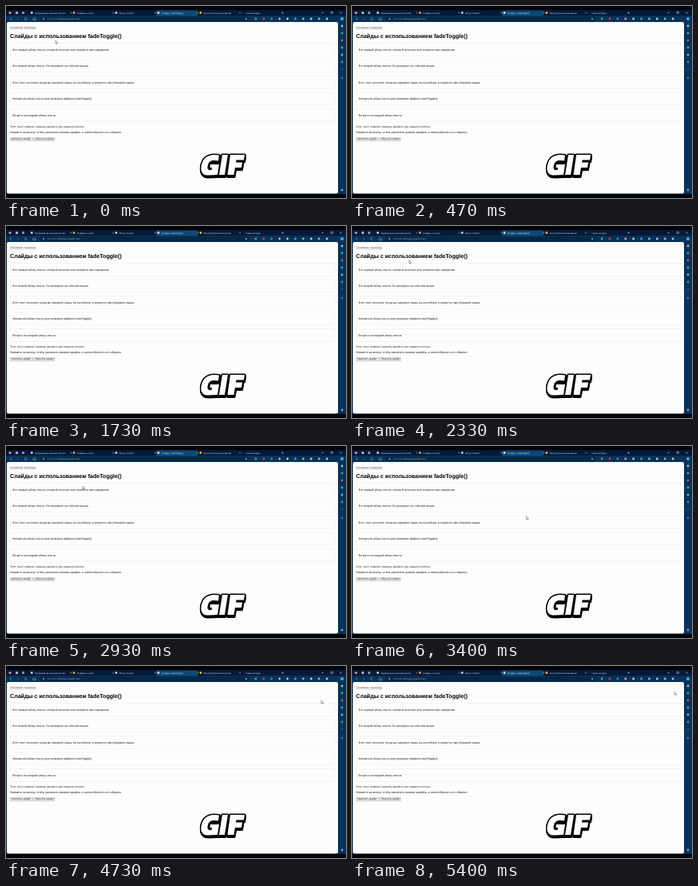
An HTML page with a canvas that plays this animation: 426 px wide and 240 px high, repeating every 5470 ms.

```html
<!DOCTYPE html>
<html lang="ru">
<head>
<meta charset="utf-8">
<title>fadeToggle</title>
<style>
html, body { margin: 0; width: 100%; height: 100%; overflow: hidden; background: #000; }
canvas { display: block; width: 426px; height: 240px; }
</style>
</head>
<body>
<canvas id="stage"></canvas>
<script>
const W = 426, H = 240, LOOP = 5470, STEP = 200 / 3;
const PAGE_SCALE = W / 1920;
const canvas = document.getElementById('stage');
const ratio = window.devicePixelRatio || 1;
canvas.width = W * ratio;
canvas.height = H * ratio;
const ctx = canvas.getContext('2d');
ctx.scale(ratio, ratio);
ctx.textRendering = 'geometricPrecision';

// time, x, y of the pointer tip
const path = [
  [0, 62, 43], [600, 58, 37], [930, 57, 37], [1730, 57, 37], [2400, 72, 43],
  [2930, 96, 50], [3930, 365, 133], [4730, 395, 43], [5400, 404, 32], [LOOP, 404, 32]
];

const paragraphs = [
  'Это первый абзац текста, который исчезнет или появится при наведении',
  'Это второй абзац текста. Он реагирует на события мыши.',
  'Этот текст исчезнет, когда вы наведете мышь на контейнер, и вернется при убирании мыши.',
  'Четвертый абзац текста для проверки эффекта fadeToggle().',
  'Пятый и последний абзац текста.'
];

const tabs = [
  ['Программные решения для ба', '#d8d8d8'], ['Слайды на показ', '#d8a24a'],
  ['Money Transfer', '#c9d3dc'], ['Слайды с fadeToggle()', '#d5dde5'],
  ['Фильтр (Показательный мат', '#f2c230'], ['Новая вкладка', null]
];

function rect(x, y, w, h, color, radius = 0) {
  ctx.fillStyle = color;
  ctx.beginPath();
  ctx.roundRect(x, y, w, h, radius);
  ctx.fill();
}

function dot(x, y, r, color) {
  ctx.fillStyle = color;
  ctx.beginPath();
  ctx.arc(x, y, r, 0, Math.PI * 2);
  ctx.fill();
}

function line(points, color, width = 0.5) {
  ctx.strokeStyle = color;
  ctx.lineWidth = width;
  ctx.beginPath();
  points.forEach(([x, y]) => ctx.lineTo(x, y));
  ctx.stroke();
}

// size is given in the pixels of the full-size screen
function text(value, x, y, size, color = '#161616', weight = 400) {
  ctx.save();
  ctx.translate(x, y);
  ctx.scale(PAGE_SCALE, PAGE_SCALE);
  ctx.font = `${weight} ${size}px "Liberation Sans", Arial, sans-serif`;
  ctx.fillStyle = color;
  ctx.fillText(value, 0, 0);
  ctx.restore();
}

function cross(x, y, color) {
  line([[x - 1, y - 1], [x + 1, y + 1]], color);
  line([[x + 1, y - 1], [x - 1, y + 1]], color);
}

function drawBrowser() {
  rect(0, 0, W, H, '#000308');
  rect(0, 5, W, 230, '#04193a');
  rect(0, 12, W, 8, '#083258');
  rect(416, 20, 10, 215, '#083258');

  dot(5, 8.5, 1.6, '#d99a91');
  rect(12, 7, 3, 3, '#9fb0bf', 0.5);
  rect(20, 7, 3, 3, '#8293a3', 0.5);
  rect(188, 5.5, 52, 7, '#0b4a78', [1.5, 1.5, 0, 0]);
  tabs.forEach(([title, icon], i) => {
    const x = 36 + i * 52.9;
    if (icon) dot(x - 3.7, 8.5, 1.4, icon);
    text(title, x, 9.5, 12, '#dbe5ee');
    if (i < 5) cross(x + 45.5, 8.5, '#a9bccb');
  });
  line([[345, 8.5], [348, 8.5]], '#a9bccb');
  line([[346.5, 7], [346.5, 10]], '#a9bccb');
  line([[395, 8.5], [398, 8.5]], '#d5dde5');
  ctx.strokeRect(407, 7.2, 2.5, 2.5);
  cross(419.5, 8.5, '#d5dde5');

  line([[7, 14.5], [5, 16], [7, 17.5]], '#b7cad8');
  line([[14, 14.5], [16, 16], [14, 17.5]], '#64798a');
  ctx.strokeStyle = '#b7cad8';
  ctx.beginPath();
  ctx.arc(25, 16, 1.5, 0.4, 5.8);
  ctx.stroke();
  line([[33.5, 16], [35.5, 14.5], [37.5, 16], [37, 17.5], [34, 17.5], [33.5, 16]], '#b7cad8');
  rect(42, 13.2, 263, 5.7, '#062845', 2.8);
  dot(47, 16, 1, '#8fa5b6');
  text('127.0.0.1:5500/jquery/slider.html', 52, 17, 12.6, '#9db1c0');
  dot(301, 16, 1.1, '#8fa5b6');
  const tools = ['#52aa63', '#d6434a', '#5484b5', '#d8a4ac', '#b9c7d2',
    '#4a9bd9', '#9daebb', '#b9c7d2', '#9daebb', '#b9c7d2'];
  tools.forEach((color, i) => dot(313 + i * 9.9, 16, 1.4, color));
  dot(421, 16, 2.1, '#4aa7d8');

  ['#9fc2d8', '#4fa58c', '#cf4f5c', '#4c9ddb', '#6eb7d8', '#3f9a74', '#164e9c']
    .forEach((color, i) => dot(421, 25 + i * 9, 1.4, color));
  line([[419.7, 90], [422.3, 90]], '#b7cad8');
  line([[421, 88.7], [421, 91.3]], '#b7cad8');
  dot(421, 230, 1.4, '#6fa3c4');
}

function button(label, x, w) {
  rect(x, 164, w, 4.8, '#888', 0.7);
  rect(x + 0.35, 164.35, w - 0.7, 4.1, '#efefef', 0.5);
  text(label, x + 1.7, 167.4, 13.33, '#111');
}

function drawPage() {
  rect(1, 20, 415, 214.5, '#fdfdfd', 2);
  text('Основная страница', 5, 28.3, 16, '#555');
  line([[5, 28.9], [38, 28.9]], '#777', 0.3);
  text('Слайды с использованием fadeToggle()', 5, 40, 32, '#000', 700);
  paragraphs.forEach((copy, i) => {
    const y = 46.5 + i * 20.5;
    ctx.strokeStyle = '#ededdf';
    ctx.lineWidth = 0.5;
    ctx.strokeRect(5.2, y, 406.8, 15.8);
    text(copy, 7.7, y + 9, 16);
  });
  text('Этот текст изменит размер шрифта при нажатии кнопок.', 5, 152, 16, '#333');
  text('Нажмите на кнопку, чтобы увеличить размер шрифта, а затем сбросить его обратно.', 5, 159, 16);
  button('Увеличить шрифт', 5, 28.5);
  button('Сбросить шрифт', 34.7, 26.5);
}

const lettering = new Path2D(
  'M267 186.5 C252 184 246 191 244.5 201 C243.5 209 248 212 254 211.5 L265 211 L267 198 L256 198' +
  'L255.5 202 L258 202 L257.5 205 C252 206 252 202 253 199 C254 193 259 192 266 193.5 Z' +
  'M271 186 H278 L274 211 H267 Z' +
  'M281 186 H299 L298 192.5 H288.5 L288 195.5 H296 L295 202 H287 L285.5 211 H277.5 Z'
);

function drawSticker() {
  ctx.save();
  ctx.lineJoin = 'round';
  ctx.lineWidth = 3;
  ctx.strokeStyle = ctx.fillStyle = '#000';
  for (let depth = 0; depth <= 2.5; depth += 0.5) {
    ctx.save();
    ctx.translate(depth * 0.2, depth);
    ctx.fill(lettering);
    ctx.stroke(lettering);
    ctx.restore();
  }
  ctx.fillStyle = '#fff';
  ctx.fill(lettering);
  ctx.restore();
}

function pointerAt(time) {
  const i = path.findIndex(point => point[0] > time);
  const [t0, x0, y0] = path[i - 1], [t1, x1, y1] = path[i];
  const p = (time - t0) / (t1 - t0);
  const ease = p * p * (3 - 2 * p);
  return [x0 + (x1 - x0) * ease, y0 + (y1 - y0) * ease];
}

function drawPointer(time) {
  const [x, y] = pointerAt(time);
  if (x < 146 && y > 33 && y < 42) {
    line([[x, y - 2], [x, y + 2]], '#555', 0.4);
    return;
  }
  ctx.beginPath();
  [[0, 0], [0, 4], [0.9, 3.2], [1.6, 4.6], [2.2, 4.3], [1.6, 3], [2.8, 2.9]]
    .forEach(([dx, dy]) => ctx.lineTo(x + dx, y + dy));
  ctx.closePath();
  ctx.fillStyle = '#fff';
  ctx.fill();
  ctx.strokeStyle = '#333';
  ctx.lineWidth = 0.4;
  ctx.stroke();
}

const start = performance.now();
function render() {
  const time = (performance.now() - start) % LOOP;
  drawBrowser();
  drawPage();
  // steps fall on rounded ten-millisecond marks
  drawPointer(Math.floor((time + 5) / STEP) * STEP);
  drawSticker();
  requestAnimationFrame(render);
}
render();
</script>
</body>
</html>
```
